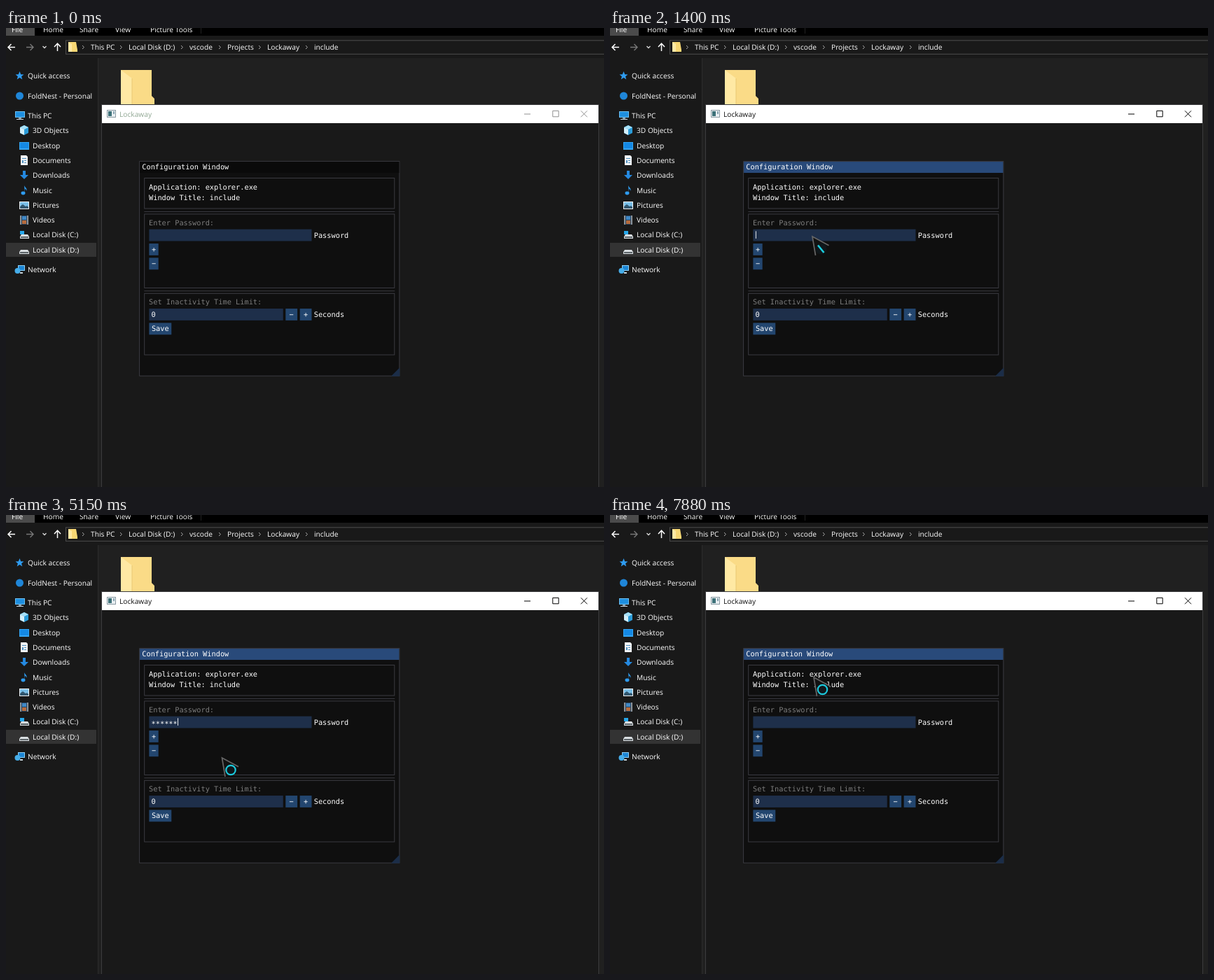
Recreate the animation shown at these times as an HTML page. Size 854 by 656 pixels, loop 8000 ms.

```html
<!DOCTYPE html>
<html lang="en">
<head>
<meta charset="utf-8">
<title>Configuration window</title>
<style>
html, body { margin: 0; width: 100%; height: 100%; overflow: hidden; background: #191919; }
svg { display: block; width: 854px; height: 656px; }
text { font: 10.2px "Open Sans", "Noto Sans", sans-serif; fill: #fff; white-space: pre; text-rendering: geometricPrecision; }
.mono { font: 11.63px "DejaVu Sans Mono", "Noto Sans Mono", monospace; }
rect { shape-rendering: crispEdges; }
.soft rect { shape-rendering: auto; }
</style>
</head>
<body>
<svg id="stage" viewBox="0 0 854 656" xmlns="http://www.w3.org/2000/svg"></svg>
<script>
const rect = (x, y, w, h, fill, extra = '') =>
  `<rect x="${x}" y="${y}" width="${w}" height="${h}" fill="${fill}" ${extra}/>`;
const frame = (x, y, w, h, stroke, fill = 'none') =>
  rect(x + .5, y + .5, w - 1, h - 1, fill, `stroke="${stroke}"`);
const path = (d, fill, stroke = 'none', width = 1, extra = '') =>
  `<path d="${d}" fill="${fill}" stroke="${stroke}" stroke-width="${width}" ${extra}/>`;
const label = (x, y, s, extra = '') => `<text x="${x}" y="${y}" ${extra}>${s}</text>`;
// y is the top of the 13 unit line
const mono = (x, y, s, extra = '') => label(x - .4, y + 10.6, s, 'class="mono" ' + extra);
const GREY = 'style="fill:#7c7c7c"', LINE = '#404047', FIELD = '#1e2f4a', BUTTON = '#23466f';

// Small icons, each drawn around its own centre
const icons = {
  star: path('M0-6L1.7-1.8 6-1.6 2.6 1.2 3.8 5.5 0 3-3.8 5.5-2.6 1.2-6-1.6-1.7-1.8Z', '#2f9cf0'),
  cloud: '<circle r="5.5" fill="#1f86d8"/>',
  pc: rect(-7, -6, 14, 9, '#6cc0f2') + rect(-6, -5, 12, 7, '#1e8fe0') + rect(-2, 3, 4, 2, '#7f95a5') + rect(-5, 5, 10, 1, '#cfd8de'),
  cube: path('M0-7L6-4V4L0 7-6 4V-4Z', '#2a9bd8') + path('M0-7L6-4 0-1-6-4Z', '#a6e0f7') + path('M-6-4L0-1V7L-6 4Z', '#d4eff9'),
  desktop: rect(-7, -5, 14, 11, '#35a6f5') + rect(-6, -4, 12, 8, '#1488e4'),
  doc: path('M-5-7H3L5-5V7H-5Z', '#f2f5f7') + rect(-3, -3, 6, 1, '#4c8fc0') + rect(-3, 0, 2, 4, '#4c8fc0') + rect(0, 0, 3, 1, '#4c8fc0') + rect(0, 3, 3, 1, '#4c8fc0'),
  down: path('M-2-6H2V0H6L0 6-6 0H-2Z', '#2589e0'),
  music: path('M0-7C1-4 5-3 3 1 3-1 2-2 1-2V4Z', '#2f9cf0') + '<ellipse cx="-1.5" cy="4" rx="3" ry="2.4" fill="#2f9cf0"/>',
  picture: rect(-7, -5, 14, 11, '#f0f3f5') + rect(-6, -4, 12, 9, '#79bfe8') + path('M-6 5V2L-2-1 2 2 4 1 6 3V5Z', '#31566e'),
  film: rect(-6, -6, 12, 13, '#8d949a') + rect(-4, -6, 8, 13, '#27435e') + rect(-3, -5, 6, 5, '#3f88c5') + rect(-3, 1, 6, 5, '#b66b3c'),
  disk: path('M-5 0H5L7 3V6H-7V3Z', '#d8dde0') + rect(-6, 3, 12, 2, '#5c6468'),
  system: path('M-4 0H5L7 3V6H-6V3Z', '#d8dde0') + rect(-5, 3, 11, 2, '#5c6468') + rect(-6, -5, 6, 5, '#27a7ea'),
  network: rect(-3, -6, 10, 8, '#8ed0f5') + rect(-2, -5, 8, 6, '#1d86d4') + '<circle cx="-3" cy="2" r="4" fill="#46aeea"/>' + rect(0, 4, 4, 2, '#c6d3da')
};
const places = [
  ['star', 68, 'Quick access', 0], ['cloud', 97, 'FoldNest - Personal', 0], ['pc', 125, 'This PC', 0],
  ['cube', 146, '3D Objects', 1], ['desktop', 168, 'Desktop', 1], ['doc', 189, 'Documents', 1],
  ['down', 210, 'Downloads', 1], ['music', 232, 'Music', 1], ['picture', 253, 'Pictures', 1],
  ['film', 274, 'Videos', 1], ['system', 295, 'Local Disk (C:)', 1], ['disk', 317, 'Local Disk (D:)', 1],
  ['network', 345, 'Network', 0]
];
const crumbs = [[121, 'This PC'], [175, 'Local Disk (D:)'], [262, 'vscode'], [316, 'Projects'], [373, 'Lockaway'], [440, 'include']];
const tabs = [[8, 'File'], [53, 'Home'], [105, 'Share'], [156, 'View'], [206, 'Picture Tools']];

const explorer =
  rect(0, 0, 854, 656, '#191919') + rect(0, 0, 854, 11, '#000') + rect(0, 0, 41, 11, '#4b4b4b') +
  rect(278, 0, 1, 8, '#222') + tabs.map(([x, s]) => label(x, 5.5, s)).join('') +
  rect(132, 43, 722, 613, '#202020') + rect(131, 43, 1, 613, '#2c2c2c') +
  path('M13 27.5H3M7.5 23L3 27.5 7.5 32', 'none', '#fff', 1.5) +
  path('M29 27.5H39M34.5 23L39 27.5 34.5 32', 'none', '#777', 1.4) +
  path('M52.5 26L55 28.5 57.5 26', 'none', '#ddd', 1.3) +
  path('M73.5 33V22M69 27L73.5 22 78 27', 'none', '#fff', 1.5) +
  '<g class="soft">' + frame(85, 17.3, 780, 20.5, '#4d4d4d') + '</g>' +
  path('M89 20H100L102 31V34H89Z', '#f7d774') + path('M89 20L94 23V34H89Z', '#ffe9a6') +
  crumbs.map(([x, s]) => path(`M${x - 12} 25l2.5 2.5-2.5 2.5`, 'none', '#aaa') + label(x, 31, s)).join('') +
  rect(0, 307, 129, 20, '#333') +
  places.map(([icon, y, s, sub]) =>
    `<g transform="translate(${sub ? 26 : 19.5} ${y})">${icons[icon]}</g>` + label(sub ? 38 : 31, y + 4, s)).join('') +
  path('M164 60H208V97L212 101V111H164Z', '#fadb87') + path('M164 60L180 72V111H164Z', '#ffe9a4') +
  path('M180 72V111', 'none', '#e9c974');

const appWindow =
  rect(136, 109, 711, 547, '#3c3c3e') + rect(137, 110, 709, 546, '#191919') +
  rect(137, 110, 709, 26, '#fff') +
  frame(144, 117, 13, 11, '#8a9aa3', '#e9eff2') + rect(146, 119, 5, 7, '#3d7179') + rect(153, 119, 2, 4, '#8aa5b3') +
  label(162, 127, 'Lockaway', 'id="caption"') +
  '<g id="controls" fill="none">' +
  path('M740 123H749M780.8 118.4H789.2V126.8H780.8ZM821 118.3L830 127.3M830 118.3L821 127.3', 'none', 'inherit') + '</g>';

const button = (x, y, w, s, id = '') =>
  rect(x, y, w, 19, BUTTON, id) + mono(x + w / 2 + .4, y + 3, s, 'text-anchor="middle"');

// The inner window is laid out in its own units and shown scaled
const OX = 190.2, OY = 190.2, SCALE = .886;
const config = `<g class="soft" transform="translate(${OX} ${OY}) scale(${SCALE})">` +
  frame(0, 0, 420, 347, LINE, '#0f0f0f') + rect(1, 1, 418, 18, '#0a0a0a', 'id="bar"') +
  mono(5, 3, 'Configuration Window') +
  frame(8, 27, 404, 50, LINE) + mono(16, 35, 'Application: explorer.exe') + mono(16, 52, 'Window Title: include') +
  rect(8, 81, 404, 1, LINE) + frame(8, 85, 404, 120, LINE) +
  mono(16, 93, 'Enter Password:', GREY) + rect(16, 110, 262, 19, FIELD) + mono(282, 113, 'Password') +
  mono(20, 116, '', 'id="stars"') + rect(20, 113, 1, 12, '#fff', 'id="caret"') +
  button(16, 133, 15, '+', 'id="plus"') + button(16, 156, 15, '−') +
  rect(8, 209, 404, 1, LINE) + frame(8, 213, 404, 100, LINE) +
  mono(16, 221, 'Set Inactivity Time Limit:', GREY) + rect(16, 238, 216, 19, FIELD) + mono(20, 241, '0') +
  button(236, 238, 19, '−') + button(259, 238, 19, '+') + mono(282, 241, 'Seconds') + button(16, 261, 36, 'Save') +
  path('M420 333V347H406Z', '#1b2d48') + '</g>';

const pointer = '<g id="pointer">' +
  path('M0 0L4.5 27 24 12.5Z', '#121212') + path('M4.5 27L0 0 23.5 12.7', 'none', '#666', 1.7) +
  '<circle cx="12.5" cy="17.5" r="8" fill="#0f171b"/>' +
  '<circle id="ring" cx="12.5" cy="17.5" r="6.7" fill="none" stroke-width="2.2"/>' +
  path('M8 12.5L16.5 23', 'none', '#1bcfe0', 2.6, 'id="slash"') + '</g>';

const stage = document.getElementById('stage');
stage.innerHTML = explorer + appWindow + config + pointer;
const part = id => document.getElementById(id);
const [caption, controls, bar, stars, caret, plus, arrow, ring, slash] =
  ['caption', 'controls', 'bar', 'stars', 'caret', 'plus', 'pointer', 'ring', 'slash'].map(part);

// Pointer path: time, x, y
const route = [
  [260, 722, 650], [600, 664, 456], [680, 664, 456], [930, 537, 354], [1330, 289, 298], [1600, 289, 298],
  [1930, 308.5, 347], [5680, 308.5, 347], [6020, 231, 321], [6080, 231, 321], [6150, 211, 318], [6280, 308, 332],
  [6430, 308, 332], [6550, 211, 317], [6720, 211, 317], [6950, 289, 322], [7380, 289, 322],
  [7510, 207, 326], [7680, 307, 331], [7880, 291, 232]
];
const CLICK = 1330, ADD = 6550, RELEASE = 6750;
const keys = [3700, 3950, 4180, 4650, 4900, 5130];

function pointerAt(t) {
  const i = route.findIndex(p => p[0] > t);
  if (i < 0) return route[route.length - 1].slice(1);
  const [a, ax, ay] = route[i - 1], [b, bx, by] = route[i], k = (t - a) / (b - a);
  return [ax + (bx - ax) * k, ay + (by - ay) * k];
}
const show = (node, on) => node.setAttribute('visibility', on ? 'visible' : 'hidden');
const inside = (x, y, l, t, r, b) => x >= l && x <= r && y >= t && y <= b;

function draw(t) {
  const focused = t >= 190;
  caption.style.fill = focused ? '#111' : '#91a894';
  controls.setAttribute('stroke', focused ? '#000' : '#8f8f8f');
  bar.setAttribute('fill', t >= CLICK ? '#294a7a' : '#0a0a0a');

  const typed = keys.filter(k => k <= t), count = t < ADD ? typed.length : 0;
  stars.textContent = '*'.repeat(count);
  const idle = t - Math.max(CLICK, ...typed);
  const lit = idle < 1100 || (idle - 1100) % 1200 >= 400;
  caret.setAttribute('x', 20 + count * 7);
  show(caret, t >= CLICK && t < ADD && lit);

  const here = t >= route[0][0];
  show(arrow, here);
  const [x, y] = here ? pointerAt(t) : [0, 0];
  arrow.setAttribute('transform', `translate(${x.toFixed(1)} ${y.toFixed(1)})`);
  const onField = here && inside(x, y, 204, 288, 436, 305);
  slash.style.display = onField ? '' : 'none';
  ring.style.display = onField ? 'none' : '';
  ring.setAttribute('stroke', t > 2600 && t < 2940 ? '#137490' : '#1cc9dc');
  const hover = here && inside(x, y, 204, 308, 217, 325);
  plus.setAttribute('fill', !hover ? BUTTON : t >= ADD && t < RELEASE ? '#0f87fa' : '#4296fa');
}

const start = performance.now();
function tick() {
  draw((performance.now() - start) % 8000);
  requestAnimationFrame(tick);
}
tick();
</script>
</body>
</html>
```
